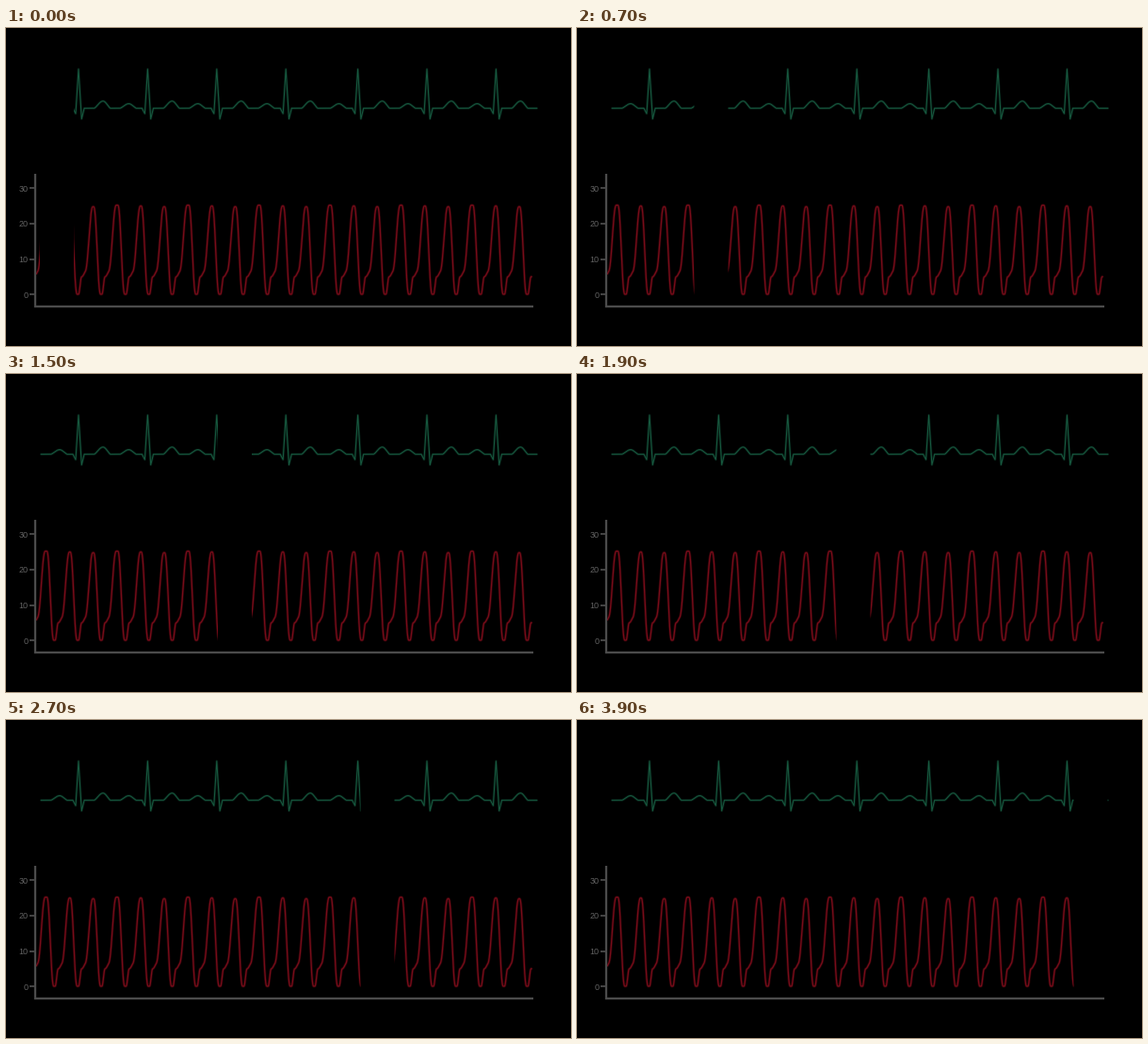
Recreate the animation shown at these times as a matplotlib script. Size 600 by 338 pixels, loop 4 s.

```python
import numpy as np
import matplotlib.pyplot as plt
from matplotlib.animation import FuncAnimation
from matplotlib.patches import Rectangle

W, H, DPI = 600, 338, 100
PX = 72 / DPI
FRAMES, INTERVAL = 40, 100
GREEN, RED, GREY, LABEL = "#175a40", "#780c19", "#4b4b4b", "#626262"

BASE = 85.3
BEAT, BEAT_GROUP = 73.4, 296.6      # four beats form a repeating group
WAVE, WAVE_GROUP = 24.85, 75.4      # three pressure waves form a group
GAP_START, GAP_STEP, GAP_WIDTH = 36.4, 12.6, 35.2


def ease(x, start, end):
    t = np.clip((x - start) / (end - start), 0, 1)
    return t ** 3 * (10 - 15 * t + 6 * t * t)


def bump(x, start, peak, end, height):
    rise = (x - start) / (peak - start)
    fall = (end - x) / (end - peak)
    s = np.clip(np.minimum(rise, fall), 0, 1)
    return height * np.sin(s * np.pi / 2) ** 1.5


def ecg():
    x = np.linspace(36.6, 564.4, 5279)
    y = np.full_like(x, BASE)
    for i in range(7):
        d = x - (77 + BEAT * (i % 4) + BEAT_GROUP * (i // 4))
        y -= bump(d, -29.5, -20, -12, 4.8)
        y -= bump(d, 16.5, 26, 34, 7.6)
        y += np.interp(d, (-6, -3, 0, 3.3, 6), (0, 5.7, -41.6, 11.3, 0))
    return x, y


def pressure():
    x = np.linspace(32, 558.6, 5267)
    local = (x - 42.9) % WAVE_GROUP
    d = local - WAVE * np.minimum(local // WAVE, 2)
    # steep fall, rebound to a shoulder, slow drift, next upstroke
    y = (188.3 + 94.7 * ease(d, 0.2, 8.1) - 18.5 * ease(d, 9, 12.8)
         - 6 * ease(d, 12, 18) - 70.2 * ease(d, 15.8, WAVE))
    # each peak in a group is slightly lower than the one before
    drop = np.round(local / WAVE) % 3 * 0.8
    return x, y + drop * np.clip((230 - y) / 42, 0, 1)


fig = plt.figure(figsize=(W / DPI, H / DPI), dpi=DPI, facecolor="black")
ax = fig.add_axes([0, 0, 1, 1])
ax.set_xlim(0, W)
ax.set_ylim(H, 0)
ax.axis("off")


def line(x, y, color, width, z, alpha=1):
    ax.plot(x, y, color=color, lw=width * PX, zorder=z, alpha=alpha,
            solid_capstyle="butt", solid_joinstyle="round")


def soft_line(x, y, color, width):
    line(x, y, color, width + 1.6, 1, 0.3)
    line(x, y, color, width, 1)


soft_line(*ecg(), GREEN, 1.0)
soft_line(*pressure(), RED, 1.3)

line((31.2, 31.2), (155, 296.5), GREY, 2.3, 3)
line((30.2, 560.3), (295.5, 295.5), GREY, 2.3, 3)
for value in (0, 10, 20, 30):
    y = 283.2 - value * 3.77
    line((25, 31), (y, y), GREY, 1.8, 3)
    ax.text(23.6, y, str(value), color=LABEL, fontsize=9 * PX,
            family="Liberation Sans", ha="right", va="center_baseline", zorder=3)

# the eraser has a slightly soft edge
covers = []
for margin, alpha in ((0, 1), (0.8, 0.5)):
    box = Rectangle((0, 35), GAP_WIDTH + 2 * margin, 257, fc="black",
                    ec="none", alpha=alpha, zorder=2)
    ax.add_patch(box)
    covers.append((box, margin))


def update(frame):
    left = GAP_START + GAP_STEP * frame
    for box, margin in covers:
        box.set_x(left - margin)
    return [box for box, _ in covers]


anim = FuncAnimation(fig, update, frames=FRAMES, interval=INTERVAL,
                     repeat=True, repeat_delay=0, blit=False)
plt.show()
```
